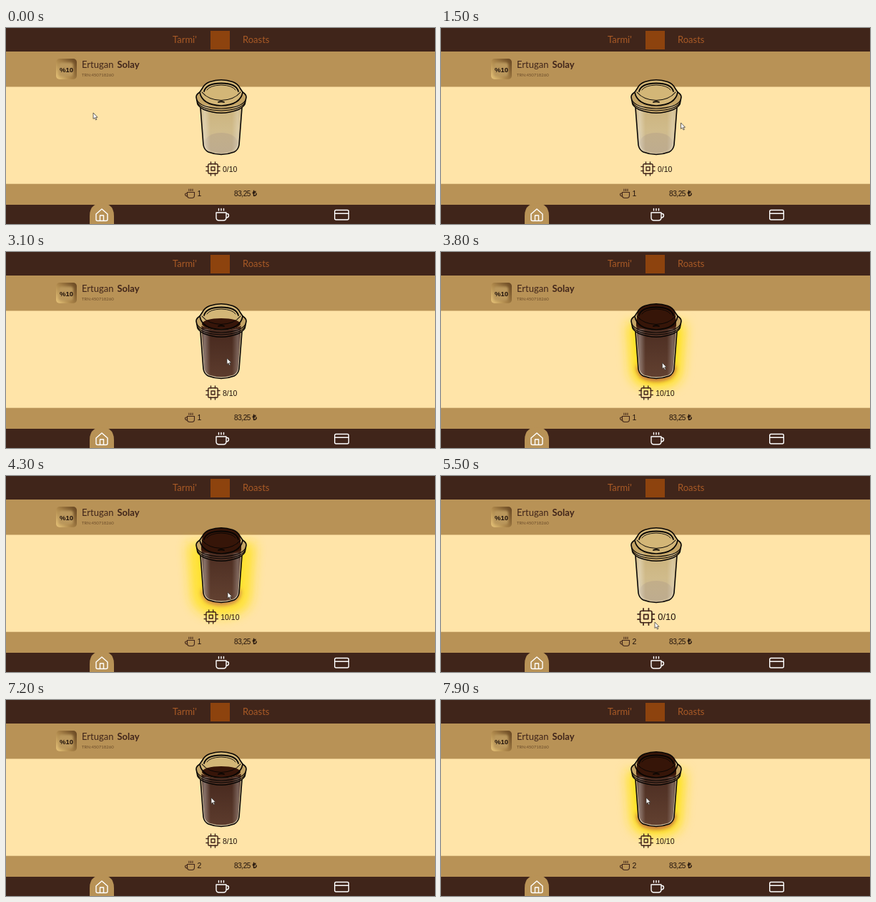
An HTML page that plays this animation: 600x275 px, repeating every 8000 ms.

```html
<!DOCTYPE html>
<html lang="tr">
<head>
<meta charset="utf-8">
<title>Coffee card</title>
<style>
html, body { margin: 0; width: 100%; height: 100%; overflow: hidden; background: #40251a; }
svg { display: block; width: 600px; height: 275px; }
text { font-family: Lato, "Open Sans", sans-serif; fill: #40251a; }
.num { font-family: "Liberation Sans", Arial, sans-serif; fill: #21130c; }
.brand { font-size: 13px; fill: #a85a26; }
.code { font-size: 6px; fill: #6b4c2a; }
.line { fill: none; stroke: #40251a; stroke-linecap: round; stroke-linejoin: round; }
.nav { fill: none; stroke: #fff; stroke-width: 1.4; stroke-linecap: round; stroke-linejoin: round; }
.ink { fill: none; stroke: #090604; stroke-width: 1.6; stroke-linecap: round; stroke-linejoin: round; }
</style>
</head>
<body>
<svg viewBox="0 0 600 275">
  <defs>
    <linearGradient id="badge" x1="0" y1=".85" x2="1" y2=".15">
      <stop offset="0" stop-color="#e0bd74"/>
      <stop offset=".45" stop-color="#a98348"/>
      <stop offset="1" stop-color="#6c4b25"/>
    </linearGradient>
    <linearGradient id="glass" x1="0" y1="0" x2="0" y2="1">
      <stop offset="0" stop-color="#c9b077"/>
      <stop offset=".5" stop-color="#cfb987"/>
      <stop offset="1" stop-color="#c6b595"/>
    </linearGradient>
    <linearGradient id="shine">
      <stop offset="0" stop-color="#fff" stop-opacity=".08"/>
      <stop offset=".1" stop-color="#fff" stop-opacity=".34"/>
      <stop offset=".24" stop-color="#fff" stop-opacity=".03"/>
      <stop offset=".76" stop-color="#fff" stop-opacity=".03"/>
      <stop offset=".9" stop-color="#fff" stop-opacity=".26"/>
      <stop offset="1" stop-color="#fff" stop-opacity=".08"/>
    </linearGradient>
    <linearGradient id="coffee" x1="0" y1="0" x2="0" y2="1">
      <stop offset="0" stop-color="#3f2015"/>
      <stop offset="1" stop-color="#63402f"/>
    </linearGradient>
    <path id="body" d="M272 108L276 164Q277 171 283 174Q301 181 319 174Q325 171 326 164L330 108Z"/>
    <path id="dome" d="M270 96L275 84Q278 78 285 75.500Q301 70 317 75.500Q324 78 327 84L332 96Q329 110 301 113Q273 110 270 96Z"/>
    <path id="rim" d="M271 90Q266 93 266 97L268 107Q270 111 277 114.500Q301 124 325 114.500Q332 111 334 107L336 97Q336 93 331 90Q328 108 301 109Q274 108 271 90Z"/>
    <clipPath id="inside">
      <path d="M275 84Q278 78 285 75.500Q301 70 317 75.500Q324 78 327 84L329 100L324.500 164Q323 170 318 172.500Q301 178 284 172.500Q279 170 277.500 164L273 100Z"/>
    </clipPath>
    <filter id="blur" x="-100%" y="-100%" width="300%" height="300%"><feGaussianBlur stdDeviation="8"/></filter>
    <filter id="halo" x="-50%" y="-100%" width="200%" height="300%"><feGaussianBlur stdDeviation="3"/></filter>
    <filter id="soft"><feGaussianBlur stdDeviation="1.5"/></filter>
  </defs>

  <rect width="600" height="275" fill="#40251a"/>
  <rect y="33" width="600" height="215" fill="#b89256"/>
  <rect y="82.500" width="600" height="136.200" fill="#ffe4a8"/>

  <text class="brand" x="233" y="20.500">Tarmi'</text>
  <rect x="286" y="4" width="27" height="26" fill="#8d430e"/>
  <text class="brand" x="331" y="20.500">Roasts</text>

  <rect x="70" y="43" width="29" height="29" rx="5" fill="url(#badge)"/>
  <rect x="74" y="48.500" width="20" height="19.500" rx="4" fill="#ba975c" filter="url(#soft)"/>
  <text class="num" x="84.500" y="62" font-size="9.500" font-weight="700" text-anchor="middle">%10</text>
  <text x="106" y="56" font-size="13">Ertugan</text>
  <text x="155.500" y="56" font-size="13" font-weight="700">Solay</text>
  <text class="code" x="106" y="67.500">TRN:450718260</text>

  <g id="glow">
    <use href="#body" id="aura" y="3" fill="#ffe000" stroke="#ffe21a" filter="url(#blur)"/>
    <path d="M276 160Q278 172 284 175Q301 182 318 175Q324 172 326 160" fill="none" stroke="#a8404a" stroke-width="5" filter="url(#halo)"/>
  </g>

  <use href="#body" fill="url(#glass)"/>
  <ellipse cx="301" cy="161" rx="23" ry="14" fill="#b3a083" opacity=".5"/>
  <use href="#dome" fill="#d3b677"/>
  <use href="#rim" fill="#c4a465"/>
  <g clip-path="url(#inside)">
    <g id="liquid">
      <path d="M268 0V110H334V0Q301 17 268 0Z" fill="url(#coffee)"/>
      <ellipse cx="301" rx="27" ry="8" fill="#371509"/>
    </g>
    <path id="full" d="M268 70H334V102Q301 117 268 102Z" fill="#361508"/>
  </g>
  <use href="#body" fill="url(#shine)"/>
  <g class="ink">
    <path d="M272 112L276 164Q277 171 283 174Q301 181 319 174Q325 171 326 164L330 112"/>
    <path d="M271 90L275 84Q278 78 285 75.500Q301 70 317 75.500Q324 78 327 84L331 90"/>
    <use href="#rim"/>
    <path d="M267 101Q272 112 301 113Q330 112 335 101" stroke-width="1.100"/>
    <path d="M268 105Q274 115 301 116Q328 115 334 105" stroke-width="1.100"/>
    <path d="M277 89Q280 77.500 301 77.500Q322 77.500 325 89" stroke-width="1.800"/>
    <path d="M281 87Q285 80.500 301 80Q317 80.500 321 87" stroke-width=".9"/>
    <path d="M274 90Q283 101 301 101.500Q319 101 328 90" stroke-width="1.100"/>
    <path d="M297 104Q301 102.500 305 104" stroke-width="1.800"/>
  </g>

  <g id="counter">
    <g class="line" stroke-width="1.400">
      <rect x="282.800" y="190.800" width="13.400" height="13.400" rx="1.800"/>
      <rect x="287" y="195" width="5" height="5"/>
      <path d="M286.500 188V191M292.500 188V191M286.500 204V207M292.500 204V207M280 194.500H283M280 200.500H283M296 194.500H299M296 200.500H299"/>
    </g>
    <text id="count" class="num" x="303" y="201.500" font-size="10.500">0/10</text>
  </g>

  <path class="line" stroke-width="1.100" d="M253.500 230.500H263.500V235Q263.500 238.500 260 238.500H257Q253.500 238.500 253.500 235ZM253.500 232H252Q250.500 232 250.500 233.500T252.500 236H253.500M256 226V228.500M258.500 226V228.500M261 226V228.500"/>
  <text id="cups" class="num" x="267.500" y="236" font-size="10.500">1</text>
  <text class="num" x="319" y="236" font-size="10" letter-spacing="-.4">83,25</text>
  <text class="num" x="344.500" y="236" font-size="11" font-weight="700">₺</text>

  <path d="M117 275V264Q117 246 134 246T151 264V275Z" fill="#b89256"/>
  <g class="nav">
    <path d="M126 261L134 254L142 261V268.500Q142 270.500 140 270.500H128Q126 270.500 126 268.500ZM131.500 270.500V263H136.500V270.500"/>
    <path d="M294 259H308V266Q308 270 304 270H298Q294 270 294 266ZM308 260.500H309Q311.500 260.500 311.500 263T309 266H308M297.500 253.500V256M301 253.500V256M304.500 253.500V256"/>
    <rect x="459.700" y="255.500" width="19.600" height="13.500" rx="2"/>
    <path d="M459.700 260.300H479.300"/>
  </g>
  <path id="cursor" d="M0 0V8.500L2 6.800L3.500 10L4.900 9.400L3.400 6.300H6Z" fill="#fff" stroke="#37322c" stroke-width=".75"/>
</svg>

<script>
const LOOP = 8000;
const CLAIM = 5100;
const $ = id => document.getElementById(id);
const clamp = v => Math.max(0, Math.min(1, v));
const ease = v => { v = clamp(v); return v * v * (3 - 2 * v); };

// time, x, y of the pointer
const path = [
  [0, 122, 119], [200, 122, 119], [1350, 335.5, 133], [1550, 335.5, 133],
  [2000, 309, 149], [3450, 309, 149], [4200, 310, 163], [4400, 310, 163],
  [4850, 299, 205], [5650, 299, 205], [6200, 287, 137], [LOOP, 287, 137]
];

// click runs that fill one cup
const runs = [{ from: 1900, gap: 165 }, { from: 6370, gap: 112 }];

function pointer(t) {
  const i = Math.max(1, path.findIndex(p => p[0] > t));
  const [a, b] = [path[i - 1], path[i]];
  const k = ease((t - a[0]) / (b[0] - a[0]));
  return [a[1] + (b[1] - a[1]) * k, a[2] + (b[2] - a[2]) * k];
}

function draw(t) {
  const [x, y] = pointer(t);
  $('cursor').setAttribute('transform', `translate(${x} ${y})`);

  const run = runs[t < CLAIM ? 0 : 1];
  const n = Math.max(0, Math.min(10, Math.floor((t - run.from) / run.gap) + 1));
  const level = 172 - n * 71 / 8;
  $('liquid').style.display = n ? '' : 'none';
  $('liquid').setAttribute('transform', `translate(0 ${level})`);
  $('full').style.display = n === 10 ? '' : 'none';

  const age = t - run.from - 9 * run.gap;
  const pulse = age < 500 ? 0 : (1 - Math.cos((age - 500) / 400 * Math.PI)) / 2;
  $('glow').style.opacity = n === 10 ? clamp(age / 250) * (1 - .15 * pulse) : 0;
  $('aura').setAttribute('stroke-width', 22 + 12 * pulse);

  const hover = ease((t - 4700) / 200) - ease((t - 5680) / 200);
  const s = 1 + .23 * hover;
  const shift = n === 10 ? -2.8 : 0;
  $('counter').setAttribute('transform',
    `translate(301.5 197.5) scale(${s}) translate(${shift - 301.5} -197.5)`);
  $('count').textContent = n + '/10';
  $('cups').textContent = t < CLAIM ? 1 : 2;
}

const start = performance.now();
function tick() {
  draw((performance.now() - start) % LOOP);
  requestAnimationFrame(tick);
}
tick();
</script>
</body>
</html>
```
